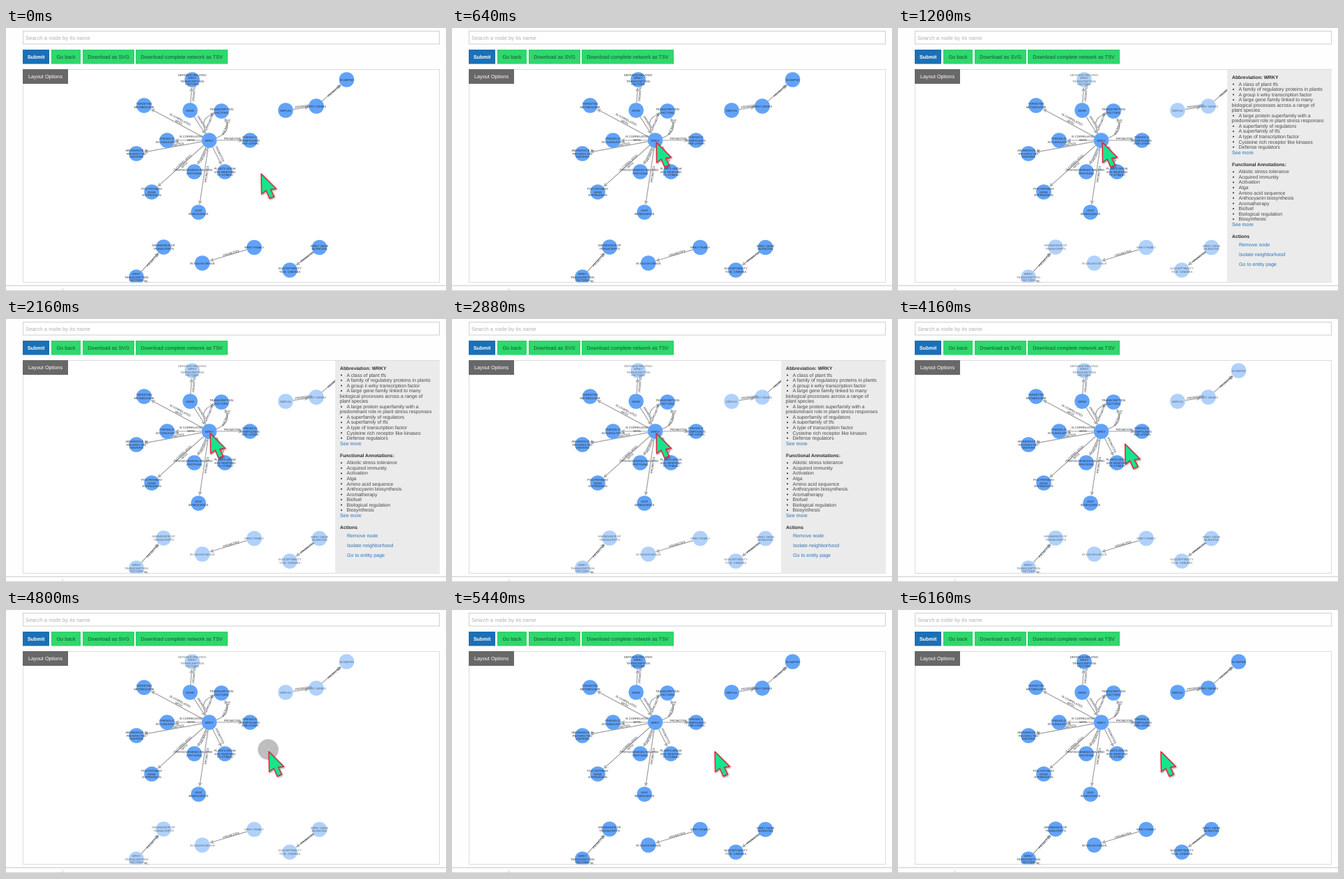
An HTML page for the animation above (6240 ms loop, 631 by 377 pixels).

```html
<!DOCTYPE html>
<html lang="en">
<head>
<meta charset="utf-8">
<title>Network view</title>
<style>
  html, body { margin: 0; width: 100%; height: 100%; overflow: hidden; background: #fff; }
  svg { display: block; width: 631px; height: 377px; }
  text { font-family: "Liberation Sans", Arial, Helvetica, sans-serif; text-rendering: geometricPrecision; }
  .ui { font-size: 7.3px; }
  .hint { font-size: 7.8px; fill: #b0b0b0; }
  .side { font-size: 7px; fill: #484848; }
  .bold { font-size: 6.8px; font-weight: bold; fill: #2c2c2c; }
  .link { font-size: 7.1px; fill: #2a70b8; }
  .tiny { font-size: 4.2px; fill: #28303a; text-anchor: middle; }
</style>
</head>
<body>
<svg id="stage" viewBox="0 0 631 377">
  <defs>
    <clipPath id="box"><rect x="24" y="60" width="598" height="304.5"/></clipPath>
    <filter id="shade" x="-30%" y="-30%" width="170%" height="170%">
      <feDropShadow dx="1" dy="1.2" stdDeviation="1" flood-opacity=".4"/>
    </filter>
  </defs>
  <rect width="631" height="377" fill="#fefefe"/>
  <g id="page"></g>
  <g clip-path="url(#box)">
    <g id="edges"></g>
    <g id="nodes"></g>
    <g id="press">
      <circle cx="376" cy="200" r="15" fill="#c6c6c6"/>
      <g id="rings" fill="none" stroke="#a9a9a9" stroke-width=".6"></g>
    </g>
  </g>
  <g id="panel"></g>
  <path id="cursor" d="M0 0L.5 29L7 24L12 35.5L18.5 32.5L13.5 22.5L21.5 21.5Z" fill="#14e58c"
        stroke="#e0243f" stroke-width="1.5" stroke-linejoin="round" filter="url(#shade)"/>
</svg>
<script>
const LOOP = 6240, STEP = 80, R = 10.8;
const $ = id => document.getElementById(id);

function add(parent, tag, attrs, label) {
  const el = document.createElementNS("http://www.w3.org/2000/svg", tag);
  for (const k in attrs) el.setAttribute(k, attrs[k]);
  if (label) el.textContent = label;
  parent.appendChild(el);
  return el;
}

// Page furniture
const page = $("page");
function box(x, y, width, height, fill, stroke) {
  add(page, "rect", { x: x + .5, y: y + .5, width: width - 1, height: height - 1, fill, stroke });
}
function button(x, width, label, fill, stroke, color, weight = "normal", y = 31, height = 20.5) {
  box(x, y, width, height, fill, stroke);
  add(page, "text", {
    class: "ui", x: x + width / 2, y: y + height / 2 + 2.5,
    fill: color, "font-weight": weight, "text-anchor": "middle"
  }, label);
}
box(24, 4, 598, 19.5, "#fff", "#cfcfcf");
add(page, "text", { class: "hint", x: 28, y: 16.5 }, "Search a node by its name");
button(24, 38, "Submit", "#1b70b6", "#1b6cb0", "#fff", "bold");
for (const [x, w, label] of [[65, 42, "Go back"], [110, 74, "Download as SVG"],
                             [186, 132, "Download complete network as TSV"]])
  button(x, w, label, "#2ed86c", "#2bd067", "#17512f");
box(24, 59, 598, 306, "#fff", "#dcdcdc");
add(page, "path", { d: "M0 369.3H631", stroke: "#c8c8c8" });
add(page, "path", { d: "M0 376.5H631M81.5 373V377", stroke: "#d2d2d2", fill: "none" });

// Network
const nodes = {
  def: [267, 74, "DEFENCE-RELATED/WRKY/TRANSCRIPTION/FACTORS", 1],
  met: [198, 111, "TARGETED/METABOLOME"],
  gene: [264, 118, "GENE"],
  tf: [309, 119, "TRANSCRIPTION/FACTORS"],
  acc: [231, 161, "PHENOLIC/ACCUMULATION"],
  hub: [291.5, 161, "WRKY"],
  lig: [350, 161, "PHENOLIC/COMPOUNDS/AND LIGNIN"],
  vin: [187, 180, "ABUNDANCE IN/PM-INFECTED/VINIFERA"],
  path: [270, 206, "PATHOGENESIS-RELATED/PROTEINS"],
  grow: [314, 206, "PLANTS GROW/AND RESPOND/TO STIMULI"],
  pod: [209, 235, "POD PATHWAY/GENE/EXPRESSION"],
  leaf: [276, 264, "LEAF/SENESCENCE"],
  gb: [401, 118, "GBPLS1", 1],
  genes: [445, 112, "WRKY GENES", 1],
  gbp: [488.5, 74, "IN GBPSH", 1],
  abu: [226, 314, "ABUNDANCE OF/TRANSCRIPTS", 1],
  wtf: [187, 357, "WRKY/TRANSCRIPTION/FACTORS", 1],
  sal: [281.5, 337, "IN SALVIA GENUS", 1],
  fam: [356, 314.5, "WRKY FAMILY", 1],
  sus: [407, 347, "SUSCEPTIBILITY/TO B. CINEREA", 1],
  sil: [449.5, 314.5, "WRKY GENE/SILENCING", 1],
  below: [250, 386, "", 1]
};
const P = "PROMOTES", C = "IS CORRELATED/WITH";
// from, to, label, sideways bend
const edges = [
  ["gene", "def", P], ["gene", "hub", P], ["hub", "tf", P, -25], ["hub", "tf", P, 25],
  ["hub", "met", C], ["hub", "acc", C], ["hub", "lig", P], ["hub", "vin", P],
  ["hub", "path", P], ["hub", "grow", P], ["hub", "pod", C], ["hub", "leaf", P],
  ["gb", "genes", P], ["genes", "gbp", P], ["wtf", "abu", P],
  ["fam", "sal", P], ["sil", "sus", P], ["below", "wtf", ""]
];

function lines(parent, x, y, label, attrs = {}) {
  const rows = label.split("/");
  const g = add(parent, "g", attrs);
  rows.forEach((row, i) =>
    add(g, "text", { class: "tiny", x, y: y + 1.5 + (i - (rows.length - 1) / 2) * 4.4 }, row));
  return g;
}

function toward(from, to, dist) {
  const a = Math.atan2(to[1] - from[1], to[0] - from[0]);
  return [from[0] + dist * Math.cos(a), from[1] + dist * Math.sin(a)];
}

const degrees = (a, b) => Math.atan2(b[1] - a[1], b[0] - a[0]) * 180 / Math.PI;

function drawEdge([from, to, label, bend = 0]) {
  const a = nodes[from], b = nodes[to];
  const dx = b[0] - a[0], dy = b[1] - a[1], len = Math.hypot(dx, dy);
  const mid = [(a[0] + b[0]) / 2, (a[1] + b[1]) / 2];
  const ctrl = [mid[0] - dy / len * bend, mid[1] + dx / len * bend];
  const start = toward(a, ctrl, R), end = toward(b, ctrl, R + 4), tip = toward(b, ctrl, R);
  add($("edges"), "path", {
    d: `M${start}Q${ctrl} ${end}`, fill: "none", stroke: "#a0a0a0", "stroke-width": 1.2
  });
  add($("edges"), "path", {
    d: "M0 0L-6 -2.9L-5 0L-6 2.9Z", fill: "#adadad",
    transform: `translate(${tip}) rotate(${degrees(ctrl, b)})`
  });
  let turn = degrees(a, b);
  if (turn >= 90) turn -= 180;
  if (turn < -90) turn += 180;
  const x = (mid[0] + ctrl[0]) / 2 + 4, y = (mid[1] + ctrl[1]) / 2 - 3;
  lines($("edges"), 0, 0, label, { transform: `translate(${x} ${y}) rotate(${turn})` });
}
edges.forEach(drawEdge);

const faded = [];
for (const [x, y, label, outside] of Object.values(nodes)) {
  const disc = add($("nodes"), "circle", { cx: x, cy: y, r: R, fill: "#61a3f8" });
  const name = lines($("nodes"), x, y, label);
  if (outside) faded.push([disc, .5], [name, .7]);
}
button(24, 65, "Layout Options", "#686868", "#686868", "#fff", "normal", 59, 21);

// Side panel
const panel = $("panel");
add(panel, "rect", { x: 472, y: 60, width: 150, height: 304.5, fill: "#ebebeb" });
const write = (x, y, label, kind = "") =>
  add(panel, "text", { class: "side " + kind, x, y: y + 2.4 }, label);

function list(title, y, items) {
  write(479, y, title, "bold");
  y += 10;
  for (const item of items) {
    item.split("/").forEach((row, i) => {
      if (!i) add(panel, "circle", { cx: 481, cy: y + .2, r: 1, fill: "#222" });
      write(i ? 478.5 : 488.5, y, row);
      y += 7.53;
    });
  }
  write(479, y, "See more", "link");
}
list("Abbreviation: WRKY", 70.3, [
  "A class of plant tfs", "A family of regulatory proteins in plants",
  "A group ii wrky transcription factor",
  "A large gene family linked to many/biological processes across a range of/plant species",
  "A large protein superfamily with a/predominant role in plant stress responses",
  "A superfamily of regulators", "A superfamily of tfs", "A type of transcription factor",
  "Cysteine rich receptor like kinases", "Defense regulators"
]);
list("Functional Annotations:", 196, [
  "Abiotic stress tolerance", "Acquired immunity", "Activation", "Alga", "Amino acid sequence",
  "Anthocyanin biosynthesis", "Aromatherapy", "Biofuel", "Biological regulation", "Biosynthesis"
]);
write(479, 298.5, "Actions", "bold");
["Remove node", "Isolate neighborhood", "Go to entity page"].forEach((s, i) =>
  write(489, 310.5 + i * 13.8, s, "link"));

for (let r = 3; r < 15; r += 2) add($("rings"), "circle", { cx: 376, cy: 200, r });

// Motion: time, x, y of the pointer tip
const track = [[0, 366, 209], [640, 293, 164], [3920, 293, 164], [4480, 377, 203], [LOOP, 377, 203]];
const ease = p => (1 - Math.cos(Math.PI * p)) / 2;
const within = (t, from, to) => t >= from && t < to;
const show = (el, on) => el.setAttribute("visibility", on ? "visible" : "hidden");

function pointer(t) {
  const i = track.findIndex(k => k[0] > t);
  const a = track[i - 1], b = track[i];
  const p = ease((t - a[0]) / (b[0] - a[0]));
  return [a[1] + (b[1] - a[1]) * p, a[2] + (b[2] - a[2]) * p];
}

function draw(now) {
  const t = Math.floor((now % LOOP) / STEP) * STEP;
  $("cursor").setAttribute("transform", `translate(${pointer(t)})`);
  show(panel, within(t, 960, 3120));
  show($("press"), within(t, 4720, 4960));
  const dim = within(t, 880, 4960);
  for (const [el, level] of faded) el.setAttribute("opacity", dim ? level : 1);
}

const began = performance.now();
function tick() {
  draw(performance.now() - began);
  requestAnimationFrame(tick);
}
tick();
</script>
</body>
</html>
```
